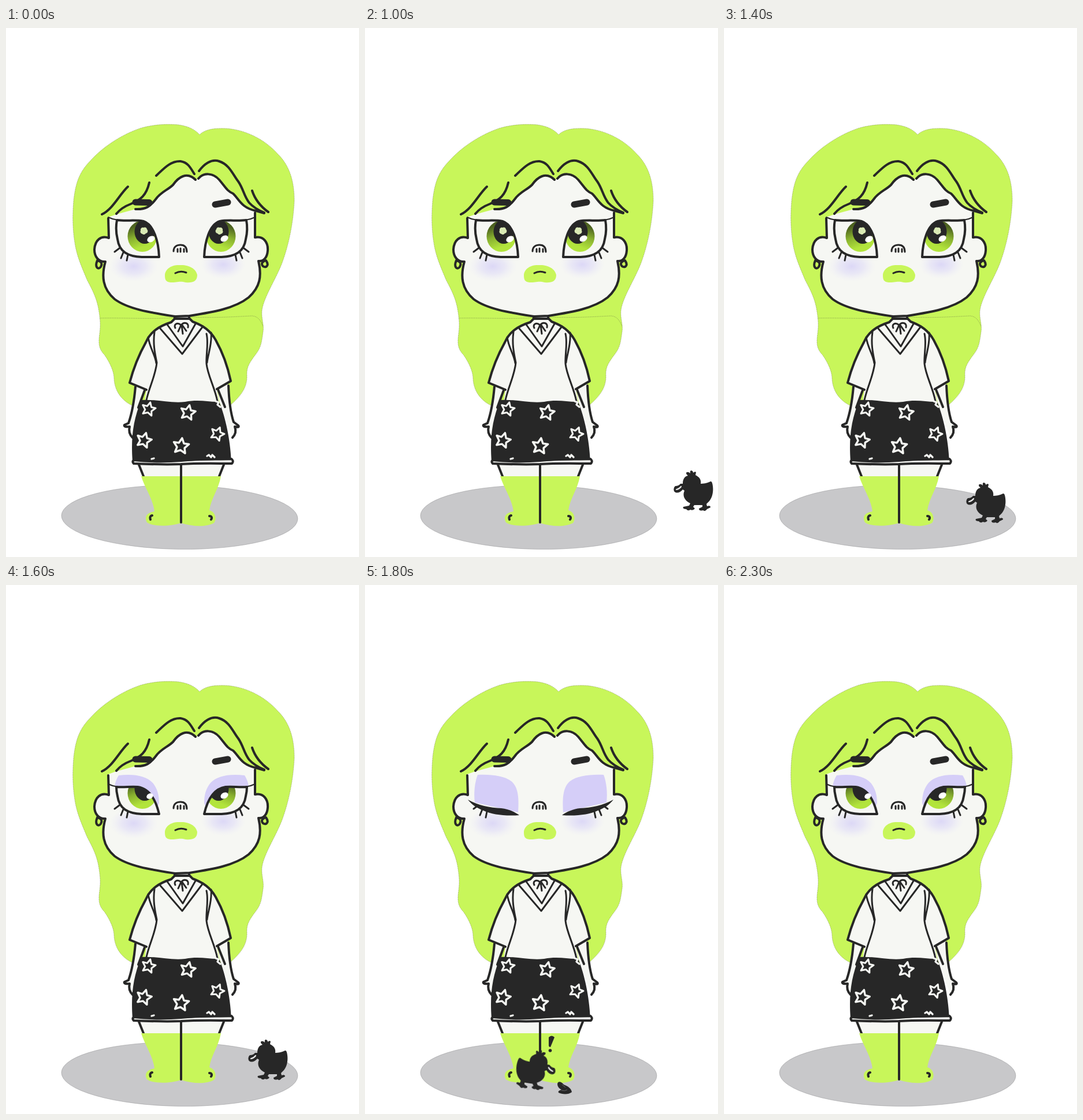
Recreate the animation shown at these times as an HTML page. Size 611 by 917 pixels, loop 2400 ms.

```html
<!DOCTYPE html>
<html lang="en">
<head>
<meta charset="utf-8">
<title>Girl and duck</title>
<style>
  html, body { margin: 0; width: 100%; height: 100%; overflow: hidden; background: #fff; }
  svg { display: block; width: 100vw; height: 100vh; }

  .ink { fill: none; stroke: #272727; stroke-width: 4; stroke-linecap: round; stroke-linejoin: round; }
  .thin { stroke-width: 3; }
  .black { fill: #272727; }
  .lime { fill: #c8f65a; }
  .skin { fill: #f6f7f3; }
  .lid { fill: #d5cef8; }
  .edge { stroke: #6f7b45; stroke-width: .5; stroke-dasharray: 2 1; }
  .star { fill: none; stroke: #f6f7f3; stroke-width: 3.2; stroke-linejoin: round; stroke-linecap: round; }

  .open, .half, .shut, .alert, .seam, .step, .duck { animation: 2400ms step-end infinite; }
  .open, .seam { animation-name: open; }
  .half { animation-name: half; }
  .shut { animation-name: shut; }
  .alert { animation-name: alert; }
  .step { animation-name: step; }
  .duck { animation-name: walk; transform-origin: 0 0; }

  @keyframes open {
    0% { visibility: visible; }
    66.66%, 100% { visibility: hidden; }
  }
  @keyframes half {
    0%, 70.83%, 100% { visibility: hidden; }
    66.66%, 95.83% { visibility: visible; }
  }
  @keyframes shut {
    0%, 95.83%, 100% { visibility: hidden; }
    70.83% { visibility: visible; }
  }
  @keyframes alert {
    0%, 87.5%, 100% { visibility: hidden; }
    75% { visibility: visible; }
  }
  @keyframes step {
    0%, 41.66%, 100% { visibility: hidden; }
    29.16% { visibility: visible; }
  }
  @keyframes walk {
    0% { transform: translate(660px, 766px); }
    41.66% { transform: translate(534px, 767px); }
    54.16% { transform: translate(484px, 773px); }
    58.33% { transform: translate(419px, 788px); }
    70.83% { transform: translate(340px, 800px); }
    75% { transform: translate(335px, 811px) rotate(9deg) scaleX(-1); }
    87.5% { transform: translate(495px, 795px) scaleX(-1); }
    91.66% { transform: translate(626px, 772px) scaleX(-1); }
    95.83%, 100% { transform: translate(720px, 766px) scaleX(-1); }
  }
</style>
</head>
<body>
<svg viewBox="0 0 611 917" preserveAspectRatio="none">
  <defs>
    <linearGradient id="iris" x1=".15" y1=".1" x2=".5" y2="1">
      <stop offset=".1" stop-color="#4c6120"/>
      <stop offset=".45" stop-color="#88b02f"/>
      <stop offset=".85" stop-color="#b2e43c"/>
    </linearGradient>
    <radialGradient id="blush">
      <stop offset="0" stop-color="#d3cdf7" stop-opacity=".75"/>
      <stop offset=".5" stop-color="#dcd8f8" stop-opacity=".5"/>
      <stop offset="1" stop-color="#ebe9f8" stop-opacity="0"/>
    </radialGradient>

    <path id="openShape" d="M192 333C210 335 224 332 238 335C256 341 264 370 265 397H235C211 396 196 388 193 366C190 354 190 344 192 333Z"/>
    <path id="halfShape" d="M191 350C205 351 215 349 228 350C248 353 259 371 265 397H235C211 396 196 388 193 366Q191 358 191 350Z"/>
    <clipPath id="openClip"><use href="#openShape"/></clipPath>
    <clipPath id="halfClip"><use href="#halfShape"/></clipPath>

    <g id="pupil">
      <ellipse cx="236" cy="361" rx="25.5" ry="27" fill="url(#iris)"/>
      <ellipse cx="240" cy="353" rx="17.5" ry="21" class="black"/>
    </g>
    <path id="lashes" class="ink thin" d="M196 382L188 388M203 389L199 399M211 393L209 403"/>

    <g id="openEye">
      <use href="#openShape" class="skin"/>
      <g clip-path="url(#openClip)">
        <use href="#pupil"/>
        <path d="M238 346a4 4 0 0 1 6 3a4 4 0 0 1-2 7a4 4 0 0 1-6 1a4 4 0 0 1-3-6a4 4 0 0 1 5-5Z" fill="#d9e9b4"/>
      </g>
      <use href="#openShape" class="ink"/>
      <path class="ink" style="stroke-width:2" d="M177 328Q185 332 194 333"/>
      <use href="#lashes"/>
    </g>

    <g id="halfEye">
      <path class="lid" d="M195 330C222 327 243 331 254 343C262 353 265 364 265 378L262 386L240 355L188 348Q190 338 195 330Z"/>
      <use href="#halfShape" class="skin"/>
      <g clip-path="url(#halfClip)"><use href="#pupil"/></g>
      <use href="#halfShape" class="ink"/>
      <path class="ink" style="stroke-width:2" d="M177 345Q185 349 194 350"/>
      <use href="#lashes"/>
    </g>

    <g id="shutEye">
      <path class="lid" d="M195 329C220 328 241 331 253 340C264 349 267 365 265 394L190 377C188 360 190 342 195 329Z"/>
      <path class="black" d="M178 372C196 382 216 386 236 387C247 388 259 393 267 399C243 401 220 398 205 391C194 387 185 381 178 372Z"/>
      <use href="#lashes"/>
    </g>

    <path id="star" class="star" d="M0-12L4-4L12-4L6 3L8 11L0 7L-8 11L-6 3L-12-4L-4-4Z"/>
  </defs>

  <ellipse cx="300.5" cy="848" rx="204.5" ry="55.5" transform="rotate(.8 300 848)" fill="#c8c8ca" stroke="#8d8d8f" stroke-width=".5"/>

  <!-- hair -->
  <path class="lime edge" d="M335 185C343 177 356 174 374 174C412 174 448 193 471 219C492 240 499 268 499 300C497 340 489 376 479 404C470 430 450 460 444 484C440 500 447 512 445 526C442 548 441 554 432 566C420 582 416 589 417 604C417 626 404 640 386 656H222C203 648 188 632 187 607C187 596 180 580 170 566C160 556 160 545 162 530C164 515 163 505 161 492C158 470 150 455 141 438C130 412 124 398 120 378C115 350 115 325 117 300C121 262 130 246 150 226C170 205 200 185 232 174C255 167 280 166 300 168C318 171 328 177 335 185Z"/>
  <path class="seam edge" fill="none" d="M162 503C200 502 260 505 292 502M320 501C360 503 405 500 426 499C437 500 441 508 445 517"/>

  <!-- legs -->
  <path class="skin" d="M229 754H378L369 780H238Z"/>
  <path class="ink" d="M230 757L238 777M377 757L369 777"/>
  <path class="lime" d="M234 777H372C368 800 355 815 352 836C363 839 365 852 360 858C345 866 322 864 303 858C285 864 255 865 244 857C239 848 243 840 257 838C254 815 240 797 234 777Z"/>
  <path class="ink" d="M303 757V857M253 845C249 846 249 849 250 852M352 846C356 846 357 849 355 852"/>

  <!-- arms -->
  <path class="skin" d="M225 616L218 665L212 684L205 690L213 694L213 704L219 711L234 650L243 622Z"/>
  <path class="ink" d="M224 622C222 645 218 668 212 685L205 688Q203 692 214 691Q211 702 219 710M240 628L229 658"/>
  <path class="skin" d="M384 616L388 655L394 680L403 690L397 692L399 700L392 710L370 650L365 622Z"/>
  <path class="ink" d="M385 620C386 645 388 665 394 683L402 689Q405 693 396 691Q400 702 392 710M367 627L379 657"/>

  <!-- top -->
  <path class="skin" d="M292 498V504L287 509C264 517 250 527 242 545C228 570 220 592 214 615L243 627L240 650H369L365 626L389 612C384 588 377 566 363 541C354 525 342 516 322 509L318 503V498Z"/>
  <path class="ink" d="M292 497V504L286 510C264 517 250 527 242 545C228 570 220 592 214 615L243 627M317 497V503L323 509C342 516 354 525 363 541C377 566 384 588 389 612L365 626M292 504H318"/>
  <path class="ink thin" d="M257 527C254 548 258 565 261 580C259 602 248 622 243 645M246 536C249 555 258 566 260 581M347 530C351 546 346 566 347 582C349 602 361 622 366 647M355 528C357 547 350 564 348 580"/>
  <path class="ink thin" d="M267 521L305 565L341 517M279 514L306 552L329 511"/>
  <path class="ink thin" d="M303 515C296 509 290 514 293 520M303 515C309 508 317 512 315 519M303 515L298 526M304 515L306 530M305 515L312 525"/>

  <!-- skirt -->
  <path class="black" d="M234 645C260 643 285 651 310 648C335 643 352 649 369 648C380 675 388 712 390 751H219C216 710 220 680 234 645Z"/>
  <path class="ink" style="fill:#f6f7f3" d="M221 749C250 752 278 752 303 750C335 747 365 748 390 747Q395 750 391 755C365 755 335 754 303 756C275 757 245 756 221 755Q218 752 221 749Z"/>
  <use href="#star" transform="translate(247 660) rotate(14) scale(.95)"/>
  <use href="#star" transform="translate(315 666) rotate(12) scale(1.05)"/>
  <use href="#star" transform="translate(366 703) rotate(22) scale(.95)"/>
  <use href="#star" transform="translate(239 714) rotate(16) scale(1.05)"/>
  <use href="#star" transform="translate(303 724) rotate(8) scale(1.1)"/>
  <path class="star" d="M363 647L368 649L366 653L371 657M348 742L351 740L355 744L357 740L361 744M252 747L256 746"/>

  <!-- face -->
  <path class="skin" d="M177 328L191 323L224 314C242 315 250 309 259 297C268 284 280 281 289 272C298 259 313 248 328 263L333 261C342 250 358 251 369 263C380 276 382 282 393 287C403 296 407 312 431 318V363C446 360 454 372 453 386C452 398 446 405 437 404C443 430 440 449 420 467C395 487 355 493 316 500H293C255 494 212 488 188 470C167 452 165 430 172 405C160 406 153 396 153 384C154 368 164 359 178 364Z"/>
  <path class="ink" d="M177 330L178 364C164 359 154 368 153 384C153 396 160 406 172 405C165 430 167 452 188 470C212 488 255 494 293 500L317 499C355 493 395 487 420 467C440 449 443 430 437 404C446 405 452 398 453 386C454 372 446 360 431 363V320"/>
  <path class="ink" d="M158 403C153 415 160 420 164 414Q168 407 161 404M450 403C457 413 448 417 444 412Q441 407 447 404"/>
  <path class="ink" d="M224 314C242 315 250 309 259 297C268 284 280 281 289 272C298 259 313 248 328 263M333 261C342 250 358 251 369 263C380 276 382 282 393 287C403 296 407 312 433 317L447 321M260 256C271 246 284 230 302 231C316 233 320 244 326 253M334 248C342 237 355 226 369 231C387 237 392 253 402 266C411 279 412 292 421 303Q430 313 447 320M426 282C431 297 440 309 454 319M211 275C196 289 185 314 166 323M248 268C243 290 233 298 216 305Q200 311 191 322"/>
  <path class="ink" style="stroke-width:11" d="M224 302L248 302.5M362 306L384 302"/>
  <ellipse cx="221" cy="413" rx="42" ry="27" fill="url(#blush)"/>
  <ellipse cx="376" cy="410" rx="39" ry="25" fill="url(#blush)"/>
  <path class="ink thin" d="M290 387C290 379 296 376 302 376C309 376 313 380 313 388M297 388V383M302 388V382M308 388V383"/>
  <path class="lime" d="M275 428C276 416 289 410 301 411C316 410 329 417 331 428C331 440 322 442 311 441C301 438 296 441 285 441C276 440 275 436 275 428Z"/>
  <path class="ink thin" d="M293 425Q302 420 312 424"/>

  <!-- eyes -->
  <g class="open">
    <use href="#openEye"/>
    <use href="#openEye" transform="matrix(-1 0 0 1 608 0)"/>
    <g fill="#fff">
      <ellipse cx="251" cy="366" rx="7" ry="5" transform="rotate(-28 251 366)"/>
      <ellipse cx="378" cy="365" rx="7" ry="5" transform="rotate(-28 378 365)"/>
    </g>
  </g>
  <g class="half">
    <use href="#halfEye"/>
    <use href="#halfEye" transform="matrix(-1 0 0 1 608 0)"/>
    <g fill="#fff">
      <ellipse cx="249" cy="366" rx="6" ry="4.5" transform="rotate(-28 249 366)"/>
      <ellipse cx="378" cy="365" rx="7" ry="5" transform="rotate(-28 378 365)"/>
    </g>
  </g>
  <g class="shut">
    <use href="#shutEye"/>
    <use href="#shutEye" transform="matrix(-1 0 0 1 608 0)"/>
  </g>

  <g class="alert">
    <path class="black" d="M318 784Q323 779 328 784L321 801Q318 801 318 798Z"/>
    <circle class="black" cx="320.5" cy="807" r="2.8"/>
    <path class="black" d="M333 865C334 859 340 861 344 866C352 869 357 873 358 879C352 884 341 883 335 880Q333 877 340 875Q333 871 333 865Z"/>
    <path d="M341 866L347 871M340 876Q346 878 350 875" fill="none" stroke="#77777a" stroke-width=".8"/>
  </g>

  <!-- first foot stepping in -->
  <path class="step black" d="M611 766C606 769 605 777 607 784C601 786 590 790 590 795Q592 799 598 797Q597 803 602 803Q606 802 607 798Q608 804 611 802Z"/>

  <g class="duck">
    <path class="black" d="M16 23C16 14 20 10 25 9Q20 5 23 3Q26 2 29 5Q28 0 31 0Q34 1 34 4Q37 1 39 3L38 8C46 12 48 17 47 23C52 23 58 22 62 20Q66 17 67 22C70 33 68 46 62 53L57 58L58 62Q64 60 64 64L58 67Q55 72 51 69Q44 71 44 66L50 63V60H36L34 63L37 66Q34 70 29 68Q25 71 22 67Q15 67 17 63L27 61L29 57C19 52 15 44 19 35L16 33C12 38 5 41 1 36Q-1 30 3 27Q9 27 12 23Z"/>
    <path d="M5 33Q10 32 13 28" fill="none" stroke="#e8e8e8" stroke-width="2.2" stroke-linecap="round"/>
  </g>
</svg>
</body>
</html>
```
